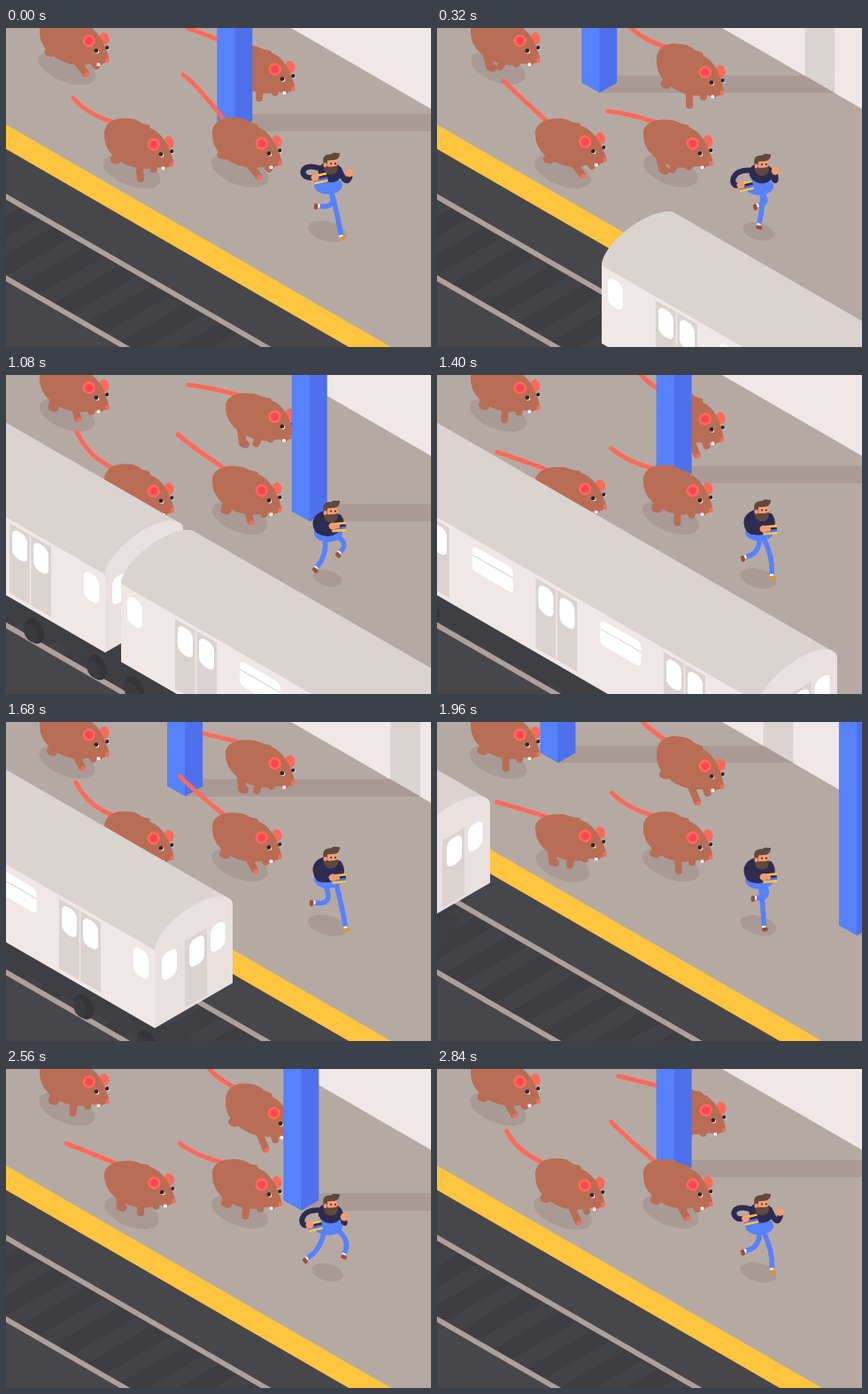
Write an HTML page with a canvas that moves like this. It is 480 by 360 pixels and loops after 2880 ms.

```html
<!DOCTYPE html>
<html lang="en">
<head>
<meta charset="utf-8">
<title>Platform chase</title>
<style>
html, body { margin: 0; width: 100%; height: 100%; overflow: hidden; background: #b5a9a3; }
canvas { display: block; }
</style>
</head>
<body>
<canvas id="stage" width="480" height="360"></canvas>
<script>
const ctx = document.getElementById('stage').getContext('2d');
const SLOPE = 0.5774, LOOP = 2880, STEP = 40;
const FLOOR = '#b5a9a3', SHADE = '#a99a96', LIGHT = '#f0e8e6', GREY = '#dad3d0';
const BROWN = '#b96d54', PINK = '#ff6959', NAVY = '#2e2b50', JEANS = '#5681ff', SKIN = '#f79a72', HAIR = '#5f483e';

const mod = (a, n) => ((a % n) + n) % n;
const mix = (a, b, w) => a + (b - a) * w;
const ease = (a, b, t) => { const w = Math.min(1, Math.max(0, (t - a) / (b - a))); return w * w * (3 - 2 * w); };

// Smooth periodic interpolation of [time, ...values] keys.
function cycle(keys, period, time) {
  const t = mod(time, period), n = keys.length;
  const key = j => keys[mod(j, n)];
  const when = j => key(j)[0] + period * Math.floor(j / n);
  let i = n - 1;
  while (key(i)[0] > t) i--;
  const span = when(i + 1) - when(i), u = (t - when(i)) / span;
  return keys[0].slice(1).map((_, k) => {
    const v = j => key(j)[k + 1];
    const slope = j => (v(j + 1) - v(j - 1)) / (when(j + 1) - when(j - 1)) * span;
    return v(i) * (1 + 2 * u) * (1 - u) ** 2 + slope(i) * u * (1 - u) ** 2
      + v(i + 1) * u * u * (3 - 2 * u) + slope(i + 1) * u * u * (u - 1);
  });
}

function poly(color, ...xy) {
  ctx.fillStyle = color;
  ctx.beginPath();
  for (let i = 0; i < xy.length; i += 2) ctx.lineTo(xy[i], xy[i + 1]);
  ctx.fill();
}
function oval(color, x, y, rx, ry = rx, angle = 0) {
  ctx.fillStyle = color;
  ctx.beginPath();
  ctx.ellipse(x, y, rx, ry, angle, 0, 7);
  ctx.fill();
}
function shape(color, d) {
  ctx.fillStyle = color;
  ctx.fill(new Path2D(d));
}
function line(color, width, d) {
  ctx.strokeStyle = color;
  ctx.lineWidth = width;
  ctx.lineCap = ctx.lineJoin = 'round';
  ctx.stroke(new Path2D(d));
}
function box(color, x, y, w, h, r = 0) {
  ctx.fillStyle = color;
  ctx.beginPath();
  ctx.roundRect(x, y, w, h, r);
  ctx.fill();
}
function within(draw, ...matrix) {
  ctx.save();
  ctx.transform(...matrix);
  draw();
  ctx.restore();
}
// Diagonal band across the stage between two heights at x = 0.
const band = (color, top, bottom) =>
  poly(color, 0, top, 480, top + 480 * SLOPE, 480, bottom + 480 * SLOPE, 0, bottom);

// ---- station ----
const pillarShift = t => 337.5 * t / 1440;
const wallX = y => 322.5 + y / SLOPE;
function pillars(t) {
  const first = 238.3 - mod(pillarShift(t), 337.5);
  return [first, first + 337.5].map(x => ({ x, y: 84 + (x - 182) * SLOPE }));
}

function station(t) {
  poly(FLOOR, 0, 0, 480, 0, 480, 360, 0, 360);
  poly(LIGHT, 322, 0, 480, 0, 480, 158 * SLOPE);
  for (const { x, y } of pillars(t)) {
    const top = y - 19.5, left = wallX(top), right = wallX(y);
    poly(GREY, left, Math.min(0, top), right, Math.min(0, top), right, y, left, top);
    poly(SHADE, x + 20, top, left, top, right, y, x + 20, y);
  }
  band('#47464a', 120, 700);
  band('#ffc53f', 109, 136.5);
  band('#3e3d41', 190, 282);
  const first = -150 - mod(pillarShift(t), 37.5);
  for (let x = first; x < 300; x += 37.5) {
    const low = 279 + x * SLOPE, far = x + 72.7, high = 195 + far * SLOPE, w = 17;
    poly('#434246', x, low, x + w, low + w * SLOPE, far + w, high + w * SLOPE, far, high);
  }
  band('#ada09c', 187, 193.7);
  band('#ada09c', 279, 285.7);
}

function drawPillar({ x, y }) {
  poly('#5681ff', x, 0, x + 20.5, 0, x + 20.5, y, x, y - 11.5);
  poly('#4f70ec', x + 20, 0, x + 40, 0, x + 40, y - 11.5, x + 20, y);
}

// ---- rats ----
const RAT_CYCLE = 576;
// time, tip x, tip y, bend y
const TAIL = [[0, 200, 53, 63], [64, 201, 58, 73], [150, 202, 63, 93], [222, 198, 78, 98], [286, 195, 89, 98],
  [320, 193, 94, 96], [404, 191, 95, 98], [436, 190, 92, 98], [476, 190, 84, 93], [504, 194, 67, 85], [540, 197, 59, 77]];
const FORE = [[0, 285, 167], [64, 284, 171], [182, 281, 171], [222, 274, 169], [320, 266, 160], [404, 268, 161], [476, 271, 163], [528, 281, 167]];
const HIND = [[0, 243, 143], [64, 242, 142], [220, 244, 147], [320, 255, 160], [404, 253, 161], [504, 247, 152]];
const PAW = [[0, 297, 159], [64, 297, 162], [240, 288, 158], [400, 284, 156]];

function rat(t, dx, dy, lead, pitch, shadow = true) {
  const at = keys => cycle(keys, RAT_CYCLE, t + lead);
  const [tipX, tipY, bend] = at(TAIL), [fx, fy] = at(FORE), [hx, hy] = at(HIND), [px, py] = at(PAW);
  const wave = time => Math.cos(time / RAT_CYCLE * 2 * Math.PI);
  const dip = 2.5 * (1 + wave(t + lead - 400));
  const body = () => {
    line(BROWN, 8, `M288 148L${px} ${py}`);
    oval(PINK, 306, 128, 5.5, 7, -0.2);
    line(BROWN, 9, `M250 140L${hx} ${hy}l3 1`);
    line(BROWN, 8, `M272 150L${fx} ${fy}`);
    if (fx > 276) oval(PINK, fx + 1, fy + 1.5, 3, 2.3, -0.6);
    shape(BROWN, `M233 120C232 ${105 + dip} 244 ${98 + dip} 259 ${99.5 + dip}C267 ${99 + dip} 272 ${103 + dip * 0.8} 276 ${106 + dip * 0.5}
      L284 ${108 + dip * 0.4}L285 112C298 117 306 131 311 149C312 156 302 158 292 156C277 160 262 157 249 148C239 141 233 132 233 120Z`);
    oval('#e8453f', 300, 157, 3.2, 2, -0.2);
    box('#fff', 297.5, 155.5, 4, 3.6, 1);
    oval(PINK, 309.5, 152.5, 2.2, 2.8);
    oval(PINK, 288.7, 130.5, 7.2);
    oval('#ff4455', 288.7, 130.5, 4.5);
    oval('#fff', 297.8, 142.4, 2.4);
    oval('#2b2528', 297, 141.6, 2.4);
    oval('#fff', 310, 138.8, 2);
    oval('#2b2528', 309.3, 138.2, 2.1);
  };
  within(() => {
    if (shadow) oval(SHADE, 264, 161, 35.5 - dip * 0.8, 16, 0.36);
    line(PINK, 5, `M${tipX} ${tipY}Q215 ${bend} 249 107`);
    // The body tips around the rump.
    ctx.translate(245, 120);
    ctx.rotate(pitch * (1 - wave(t)) / 2);
    ctx.translate(-245, -120);
    body();
  }, 1, 0, 0, 1, dx, dy);
}

// ---- runner ----
const RUN = 480;
// time, foot x, foot y, knee bend
const FOOT = [[0, 379, 237, 1], [80, 358, 227, 3], [120, 349, 219, 8], [160, 338, 215, 8], [200, 341, 209, 13], [240, 346, 203.5, 22],
  [320, 360, 201, 15], [360, 370, 205, 14], [400, 376, 214, 12], [440, 378, 228, 6]];

function leg(phase) {
  const hipX = 364 + 5 * Math.sin((phase - 300) / RUN * 2 * Math.PI), hipY = 184;
  const [fx, fy, bend] = cycle(FOOT, RUN, phase);
  const dx = fx - hipX, dy = fy - hipY, d = Math.hypot(dx, dy);
  const cx = (hipX + fx) / 2 + dy / d * bend, cy = (hipY + fy) / 2 - dx / d * bend;
  const angle = Math.atan2(fy - cy, fx - cx), planted = mod(phase + 60, RUN) < 70;
  const ex = fx - 4 * Math.cos(angle), ey = fy - 4 * Math.sin(angle);
  line(JEANS, 5.6, `M${hipX} ${hipY}Q${cx} ${cy} ${ex} ${ey}`);
  within(() => {
    box('#fff', -2.2, -3.5, 4.2, 3);
    box(planted ? '#dd9438' : '#9b5238', -2.5, -1.5, 7, 4.5, 2);
  }, Math.sin(angle), -Math.cos(angle), Math.cos(angle), Math.sin(angle), fx, fy);
}

function books(x, y, angle) {
  within(() => ['#ffc53f', '#2e2b50', '#4f70ec', '#ffc53f'].forEach((c, i) => box(c, -8, -5 + i * 2.6, 16, 2.7, 0.6)),
    Math.cos(angle), Math.sin(angle), -Math.sin(angle), Math.cos(angle), x, y);
}

function runner(t) {
  const turn = t / RUN * 2 * Math.PI;
  const swing = Math.cos(turn * 2), reach = Math.cos(turn), lift = Math.sin(turn);
  const hug = ease(400, 560, t) * (1 - ease(1960, 2120, t));
  const m = (a, b) => mix(a, b, hug);
  const bob = -0.8 * Math.cos((t - 200) / 240 * 2 * Math.PI);
  oval(SHADE, 363, 229.5, 19.5 + 3 * swing, 10 + swing, 0.25);
  within(() => leg(t + 240), 1, 0, 0, 1, 5, -3);
  leg(t);
  within(() => {
    oval(JEANS, 364, 178, 16, 10);
    oval(NAVY, m(366, 363), m(163, 167), m(13.5, 16.5), m(11.5, 14.5), m(0.2, 0));
    const bookX = m(351 + 4 * reach, 376), bookY = m(175 - 5 * reach, 174 + 3 * swing);
    const handX = m(bookX - 6, 369), handY = bookY - 1;
    line(NAVY, 6, `M${m(357, 353)} 160C${m(330, 346)} ${m(handY - 20, 174)} ${m(331, 354)} ${m(handY + 3, 183)} ${handX - 3} ${handY}`);
    const rightX = m(384 + 4 * reach, 374), rightY = m(164 + 4 * lift, 173 + 3 * swing);
    line(NAVY, 6.5, `M376 160Q${m(384, 382)} ${m(179, 170)} ${rightX} ${rightY + m(5, 0)}`);
    books(bookX, bookY, m(-0.22, -0.08));
    oval(SKIN, rightX, rightY, m(4.3, 3), m(4.6, 3));
    oval(SKIN, handX, handY, 4.5, 4);
    // head
    oval(SKIN, 367, 154, 7.5, 7.5);
    shape(HAIR, 'M358.5 152C357 145 362 142.5 367 143C371 139.5 374 142.5 377 141.5C377 147 374 149.5 369 149.5L363 150L362.5 156C364 158 366 156.5 369 157C372 156 374 156.5 374.5 155C376 162 372 166 367.5 166C361 166 358 161 358.5 152Z');
    oval(SKIN, 360.5, 155, 2, 2.5);
    oval('#2b2528', 367, 153.3, 1);
    oval('#2b2528', 372, 153.3, 1);
  }, 1, 0, 0, 1, 0, bob);
}

// ---- train ----
const CAR = 458, CAR_PITCH = 476, SIDE = 88;
const ARCH = 'C1 -24 48 -61 75 -61Q80 -61 83 -59';

function car(x) {
  const y = 268 + (x - 186) * SLOPE, drop = CAR * SLOPE;
  within(() => {
    poly('#3f3e42', 0, SIDE, CAR, SIDE + drop, CAR + 60, SIDE + drop - 20, CAR + 25, SIDE + drop + 34, 0, SIDE + 30);
    for (const w of [15, 86, 378, 449]) {
      oval('#353438', w, SIDE + w * SLOPE + 22, 10, 15, -0.45);
      oval('#3b3a3e', w - 4, SIDE + w * SLOPE + 24, 7, 11, -0.45);
    }
    shape(GREY, `M0 0${ARCH}l${CAR} ${drop}L${CAR + 88} ${drop - 51}L${CAR} ${drop + 2}L0 2Z`);
    within(() => shape('#e9e1df', `M0 0${ARCH}Q88 -57 88 -51V37L0 ${SIDE}Z`), 1, 0, 0, 1, CAR, drop);
    within(() => {
      box(GREY, 34, 9, 25, 76);
      box('#fff', 8, 10, 17, 31, 7);
      box('#fff', 39, 13, 17, 31, 7);
      box('#fff', 63, 11, 16.5, 30, 7);
    }, 1, -SLOPE, 0, 1, CAR, drop);
    within(() => {
      box(LIGHT, 0, 0, CAR, SIDE);
      for (const d of [61, 205.5, 350]) {
        box(GREY, d, 4, 47, 79);
        box(LIGHT, d + 22.7, 4, 1.6, 79);
        box('#fff', d + 3, 8, 17, 31, 7);
        box('#fff', d + 27, 8, 17, 31, 7);
      }
      for (const w of [134, 278.5]) {
        box('#fff', w, 8.5, 46, 28, 5);
        box(GREY, w, 18.5, 46, 1.2);
      }
      for (const w of [7, 434]) box('#fff', w, 8, 17, 31, 7);
    }, 1, SLOPE, 0, 1, 0, 0);
  }, 1, 0, 0, 1, x, y);
}

function train(t) {
  if (t < STEP || t > 2300) return;
  const front = 410 - 0.7 * t;
  car(front);
  car(front + CAR_PITCH);
}

function draw(t) {
  station(t);
  rat(t, 15, -84, -100, 0.08, false);
  pillars(t).forEach(drawPillar);
  rat(t, -195, -116, 0, 0);
  rat(t, 0, 0, 0, 0);
  rat(t, -122, 1, 222, -0.07);
  runner(t);
  train(t);
}

let start;
function tick(now) {
  start ??= now;
  draw(Math.floor(mod(now - start, LOOP) / STEP) * STEP);
  requestAnimationFrame(tick);
}
draw(0);
requestAnimationFrame(tick);
</script>
</body>
</html>
```
